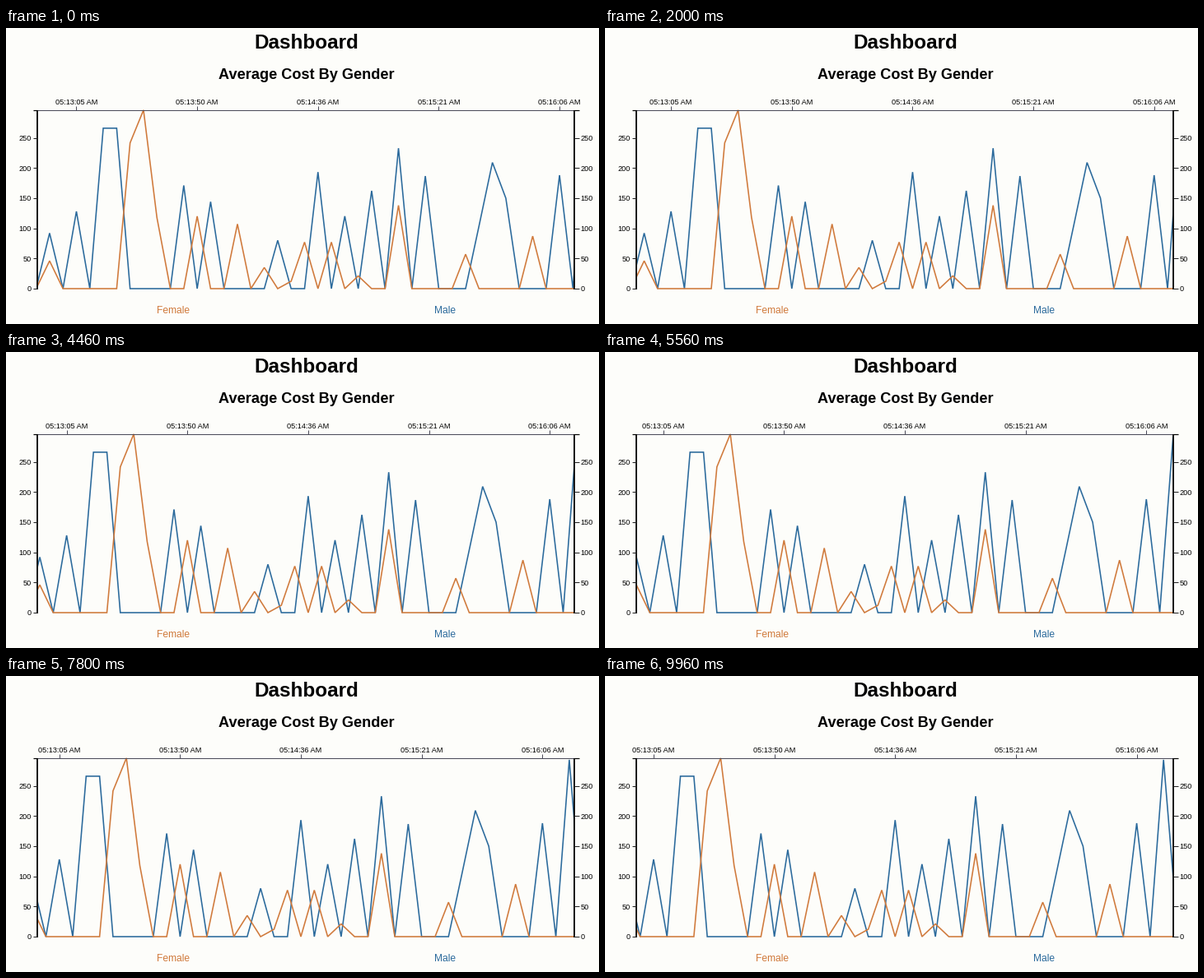
A matplotlib script that plays this animation: 720 px wide and 360 px high, repeating every 9.98 s.

```python
import matplotlib.pyplot as plt
from matplotlib.animation import FuncAnimation
from matplotlib.patches import Rectangle
import numpy as np

W, H, DPI = 720, 360, 100
PX = 72 / DPI                      # points per pixel
LOOP, INTERVAL = 9980, 20          # ms
SPEED = 2.66 / 1000                # pixels per ms
LEFT, RIGHT, TOP, BASE = 38, 690.3, 100, 317
START, STEP, UNIT = 36.6, 16.294, 0.734
BACK, BLUE, ORANGE = "#fdfdfa", "#2b6a9c", "#d07a3c"

slots = np.arange(44)
xs = START + STEP * slots

plt.rcParams["font.family"] = "Liberation Sans"
fig = plt.figure(figsize=(W / DPI, H / DPI), dpi=DPI, facecolor=BACK)
ax = fig.add_axes([0, 0, 1, 1])
ax.set_xlim(0, W)
ax.set_ylim(H, 0)
ax.axis("off")
window = Rectangle((LEFT, TOP - 1), RIGHT - LEFT, BASE - TOP + 3,
                   transform=ax.transData)


def hump(center, height, reach=1):
    """Cosine bump over the slots, zero beyond its reach."""
    d = np.clip((slots - center) / reach, -1, 1)
    return height * np.cos(np.pi / 2 * d)


def swing():
    """Spikes on every second slot whose heights follow a wave."""
    return sum(hump(21 + 2 * i, 176 - 58 * np.sin(1.6 * i - 0.3))
               for i in range(5))


def clock(i):
    seconds = int(5.5 + 45.25 * i)
    return f"05:{13 + seconds // 60}:{seconds % 60:02d} AM"


def label(x, y, text, size, ha="center", color="black", weight="normal"):
    return ax.text(x, y, text, fontsize=size * PX, ha=ha, va="baseline",
                   color=color, weight=weight)


def stroke(xs, ys, width=1.0, color="black", z=3):
    return ax.plot(xs, ys, lw=width * PX, color=color, zorder=z,
                   solid_capstyle="butt", solid_joinstyle="miter")[0]


def series(values, color, z):
    line = stroke(xs, BASE - UNIT * values, 1.6, color, z)
    line.set_clip_path(window)
    return line


def side_axis(x, out, ha):
    stroke([x, x], [TOP, BASE + 0.5], 1.8)
    stroke([x, x + out * 5.5], [TOP, TOP], 1.2)
    for value in range(0, 300, 50):
        y = BASE - UNIT * value
        stroke([x, x + out * 5.5], [y, y], 1, "#222222")
        label(x + out * 7, y + 3.4, str(value), 9.2, ha)


# each peak: slot, height, optional reach
male_peaks = [(1, 92), (3, 128), (5.5, 307, 1.5), (11, 171), (13, 144),
              (18, 80), (34.15, 211, 1.71), (39, 188), (41.05, 294)]
female_peaks = [(1, 46), (7.72, 306, 1.71), (12, 120), (15, 107), (17, 35),
                (19.9, 78), (22, 77), (24, 21), (27, 138), (32, 57), (37, 87)]
male = sum(hump(*peak) for peak in male_peaks) + swing()
female = sum(hump(*peak) for peak in female_peaks)

label(364.5, 25, "Dashboard", 24.3, weight="bold")
label(364.5, 62, "Average Cost By Gender", 18.1, weight="bold")
label(202.5, 347, "Female", 12, color=ORANGE)
label(533, 347, "Male", 12, color=BLUE)

lines = [series(male, BLUE, 1), series(female, ORANGE, 2)]
stroke([LEFT, RIGHT], [TOP, TOP], 1, "#4a4a58")
side_axis(LEFT, -1, "right")
side_axis(RIGHT, 1, "left")

tick_xs = xs[3::9]
ticks = [stroke([x, x], [TOP - 5.5, TOP], 1, "#4a4a58") for x in tick_xs]
stamps = [label(x, 93, clock(i), 9.2) for i, x in enumerate(tick_xs)]


def draw(frame):
    shift = SPEED * INTERVAL * frame
    for line in lines:
        line.set_xdata(xs - shift)
    for x, tick, stamp in zip(tick_xs, ticks, stamps):
        tick.set_xdata([x - shift, x - shift])
        stamp.set_x(x - shift)
    return lines + ticks + stamps


anim = FuncAnimation(fig, draw, frames=LOOP // INTERVAL, interval=INTERVAL,
                     repeat=True, repeat_delay=0, blit=False)
plt.show()
```
